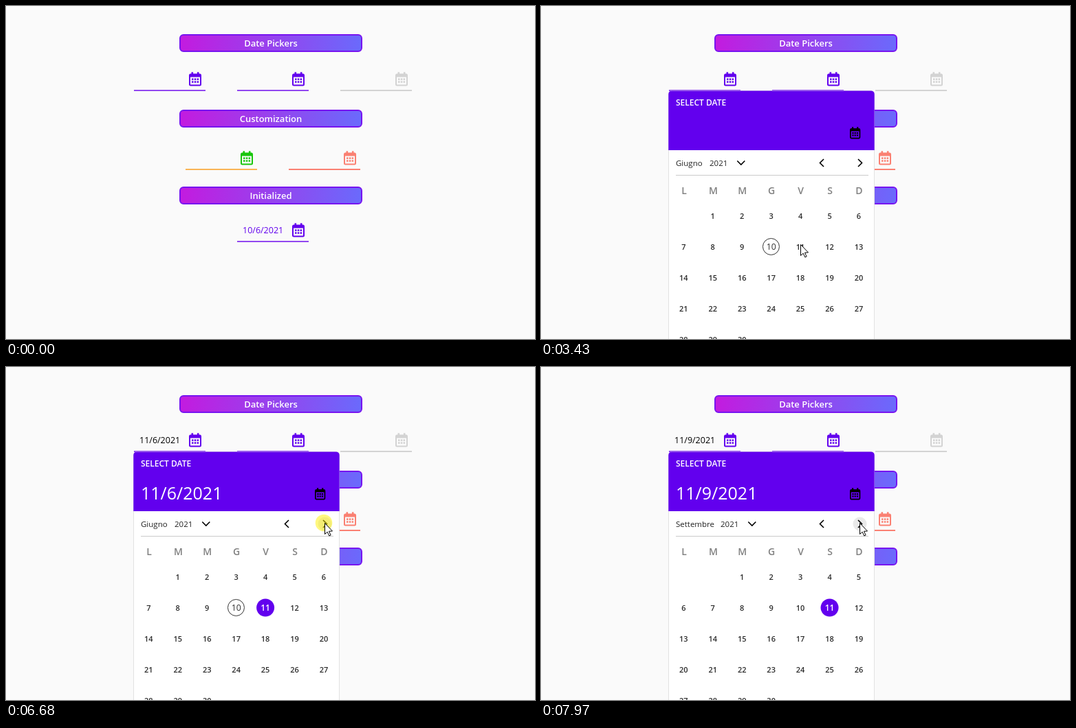
Animation of 769 by 485 pixels, one loop 8 s. Source, as an HTML page with a canvas:

```html
<!DOCTYPE html>
<html lang="it">
<head>
<meta charset="utf-8">
<title>Date Pickers</title>
<style>
html, body { margin: 0; width: 100%; height: 100%; overflow: hidden; background: #fafafa; }
canvas { display: block; }
</style>
</head>
<body>
<canvas id="stage" width="769" height="485"></canvas>
<script>
const ctx = document.getElementById('stage').getContext('2d');
const LOOP = 8000;
const PURPLE = '#6200ee';
const LINE = '#9147f0';
const GREY = '#d3d3d3';
const SALMON = '#fa8072';

// Column of day 1, days in the month, x of the year label
const MONTHS = {
  6: { name: 'Giugno', first: 1, days: 30, yearX: 245 },
  7: { name: 'Luglio', first: 3, days: 31, yearX: 239 },
  8: { name: 'Agosto', first: 6, days: 31, yearX: 245 },
  9: { name: 'Settembre', first: 2, days: 30, yearX: 261 }
};

// Pointer moves: [time, x, y]
const MOVES = [
  [[900, 294, -18], [1160, 284, 50], [1330, 280, 97], [1430, 282, 107]],
  [[2420, 282, 107], [2640, 340, 170], [2880, 430, 270], [3030, 428, 314], [3210, 384, 332], [3430, 377, 347]],
  [[4370, 377, 347], [4720, 322, 214], [5080, 275, 104]],
  [[5300, 275, 104], [5640, 350, 164], [5970, 428, 220], [6200, 463, 227]]
];
const PRESSES = [[1570, 1680], [4020, 4090], [5180, 5280], [6680, 6790], [7250, 7350], [7740, 7840]];

function between(t, a, b) { return t >= a && t < b; }

// Cubic Hermite through the keys, at rest at both ends
function follow(keys, t) {
  const last = keys.length - 1;
  if (t >= keys[last][0]) return keys[last].slice(1);
  const i = keys.findIndex((k, n) => n < last && t < keys[n + 1][0]);
  const a = keys[i], b = keys[i + 1], span = b[0] - a[0];
  const u = (t - a[0]) / span, u2 = u * u, u3 = u2 * u;
  const slope = (n, c) => n === 0 || n === last ? 0
    : (keys[n + 1][c] - keys[n - 1][c]) / (keys[n + 1][0] - keys[n - 1][0]);
  return [1, 2].map(c =>
    (2 * u3 - 3 * u2 + 1) * a[c] + (3 * u2 - 2 * u3) * b[c] +
    span * ((u3 - 2 * u2 + u) * slope(i, c) + (u3 - u2) * slope(i + 1, c)));
}

function pointerAt(t) {
  const move = MOVES.filter(keys => t >= keys[0][0]).pop();
  return move ? follow(move, t).map(Math.round) : null;
}

function text(str, x, y, size, color, weight = 400, align = 'left') {
  ctx.font = `${weight} ${size}px "Open Sans", "Noto Sans", sans-serif`;
  ctx.textAlign = align;
  ctx.fillStyle = color;
  ctx.fillText(str, x, y);
}

function rect(x, y, w, h, color) {
  ctx.fillStyle = color;
  ctx.fillRect(x, y, w, h);
}

function disc(x, y, r, color) {
  ctx.beginPath();
  ctx.arc(x, y, r, 0, Math.PI * 2);
  ctx.fillStyle = color;
  ctx.fill();
}

function stroke(points, color, width) {
  ctx.beginPath();
  points.forEach(([x, y]) => ctx.lineTo(x, y));
  ctx.strokeStyle = color;
  ctx.lineWidth = width;
  ctx.stroke();
}

function banner(label, y) {
  const fill = ctx.createLinearGradient(254, y, 516, y + 26);
  fill.addColorStop(0, '#c31bdf');
  fill.addColorStop(1, '#6a6afc');
  ctx.beginPath();
  ctx.roundRect(253, y + 1, 264, 24, 5);
  ctx.fillStyle = fill;
  ctx.fill();
  ctx.strokeStyle = '#7714f0';
  ctx.lineWidth = 2;
  ctx.stroke();
  text(label, 385, y + 18, 13, '#fff', 600, 'center');
}

function calendarIcon(x, y, color, scale = 1) {
  ctx.save();
  ctx.translate(x, y);
  ctx.scale(scale, scale);
  ctx.beginPath();
  ctx.roundRect(1, 3.5, 16, 16, 1.5);
  ctx.strokeStyle = color;
  ctx.lineWidth = 2;
  ctx.stroke();
  rect(1, 3, 16, 4.5, color);
  rect(3.5, 0.3, 2.6, 4, color);
  rect(11.9, 0.3, 2.6, 4, color);
  for (let i = 0; i < 6; i++) {
    rect(4 + (i % 3) * 3.8, 9.4 + Math.floor(i / 3) * 3.9, 2.5, 2.5, color);
  }
  ctx.restore();
}

function field(x, y, iconColor, lineColor, value, valueColor) {
  rect(x, y + 26, 104, 2, lineColor);
  calendarIcon(x + 80, y, iconColor);
  if (value) text(value, x + 8, y + 15, 12.5, valueColor);
}

function drawPage(date) {
  rect(0, 0, 769, 485, '#fafafa');
  banner('Date Pickers', 41);
  banner('Customization', 151);
  banner('Initialized', 263);
  field(186, 96, PURPLE, LINE, date, '#000');
  field(336, 96, PURPLE, LINE);
  field(486, 96, GREY, GREY);
  field(261, 211, '#19c60c', '#f9b455');
  field(411, 211, SALMON, SALMON);
  field(336, 316, PURPLE, LINE, '10/6/2021', PURPLE);
}

function drawDays(month, number, selected) {
  for (let day = 1; day <= month.days; day++) {
    const cell = day + month.first - 1;
    const x = 207.3 + (cell % 7) * 42.45;
    const y = 306 + Math.floor(cell / 7) * 45;
    if (selected && day === 11) {
      disc(x, y - 0.5, 13, PURPLE);
      text(day, x, y + 4, 12, '#fff', 600, 'center');
    } else if (number === 6 && day === 10) {
      ctx.beginPath();
      ctx.arc(x - 0.2, y - 0.5, 12, 0, Math.PI * 2);
      ctx.strokeStyle = '#333';
      ctx.lineWidth = 1;
      ctx.stroke();
      text(day, x + 0.2, y + 4, 12.3, '#333', 400, 'center');
    } else {
      text(day, x, y + 4, 11, '#2b2b2b', 600, 'center');
    }
  }
}

function drawPopup(number, date, hover) {
  const month = MONTHS[number];
  ctx.beginPath();
  ctx.roundRect(185.5, 123.5, 299, 380, 5);
  ctx.fillStyle = '#fff';
  ctx.fill();
  ctx.strokeStyle = '#e2e2e2';
  ctx.lineWidth = 1;
  ctx.stroke();
  ctx.beginPath();
  ctx.roundRect(185.3, 123.4, 299.4, 86.6, [5, 5, 0, 0]);
  ctx.fillStyle = PURPLE;
  ctx.fill();

  text('SELECT DATE', 196, 145, 12, '#fff', 600);
  if (date) text(date, 196, 193, 25, '#fff', 500);
  calendarIcon(449, 176, '#000', 0.85);

  text(month.name, 196, 233, 11.5, '#222');
  text('2021', month.yearX, 233, 11.5, '#222');
  const drop = month.yearX + 45.8;
  stroke([[drop - 5.5, 225.5], [drop, 231], [drop + 5.5, 225.5]], '#000', 1.6);
  if (hover) disc(463.5, 228.5, 10, '#e9e9e9');
  stroke([[411, 223], [405.5, 228.5], [411, 234]], '#000', 1.6);
  stroke([[461, 223], [466.5, 228.5], [461, 234]], '#000', 1.6);
  rect(196, 246, 280, 1, '#cbcbcb');

  [...'LMMGVSD'].forEach((name, i) =>
    text(name, 208 + i * 42.4, 274, 14, '#808080', 600, 'center'));
  drawDays(month, number, Boolean(date));
}

function drawPointer(x, y) {
  const outline = [[0, 0], [0, 16], [3.7, 12.7], [6.3, 18.4], [8.6, 17.4], [6, 11.8], [11, 11.5]];
  ctx.beginPath();
  outline.forEach(([dx, dy]) => ctx.lineTo(x + 0.5 + dx, y + 0.5 + dy));
  ctx.closePath();
  ctx.fillStyle = '#fff';
  ctx.fill();
  ctx.strokeStyle = '#000';
  ctx.lineWidth = 1;
  ctx.stroke();
}

function render(t) {
  const open = between(t, 1640, 4060) || t >= 5200;
  const number = 6 + [6790, 7350, 7840].filter(start => t >= start).length;
  const date = t >= 4040 ? `11/${number}/2021` : '';
  const pointer = pointerAt(t);

  drawPage(date);
  if (open) drawPopup(number, date, t >= 6150);
  if (!pointer) return;
  const [x, y] = pointer;
  if (PRESSES.some(([a, b]) => between(t, a, b))) {
    disc(x - 1, y, 12.3, 'rgba(255, 242, 0, 0.5)');
  }
  drawPointer(x, y);
}

const start = performance.now();
function tick() {
  render((performance.now() - start) % LOOP);
  requestAnimationFrame(tick);
}
tick();
</script>
</body>
</html>
```
